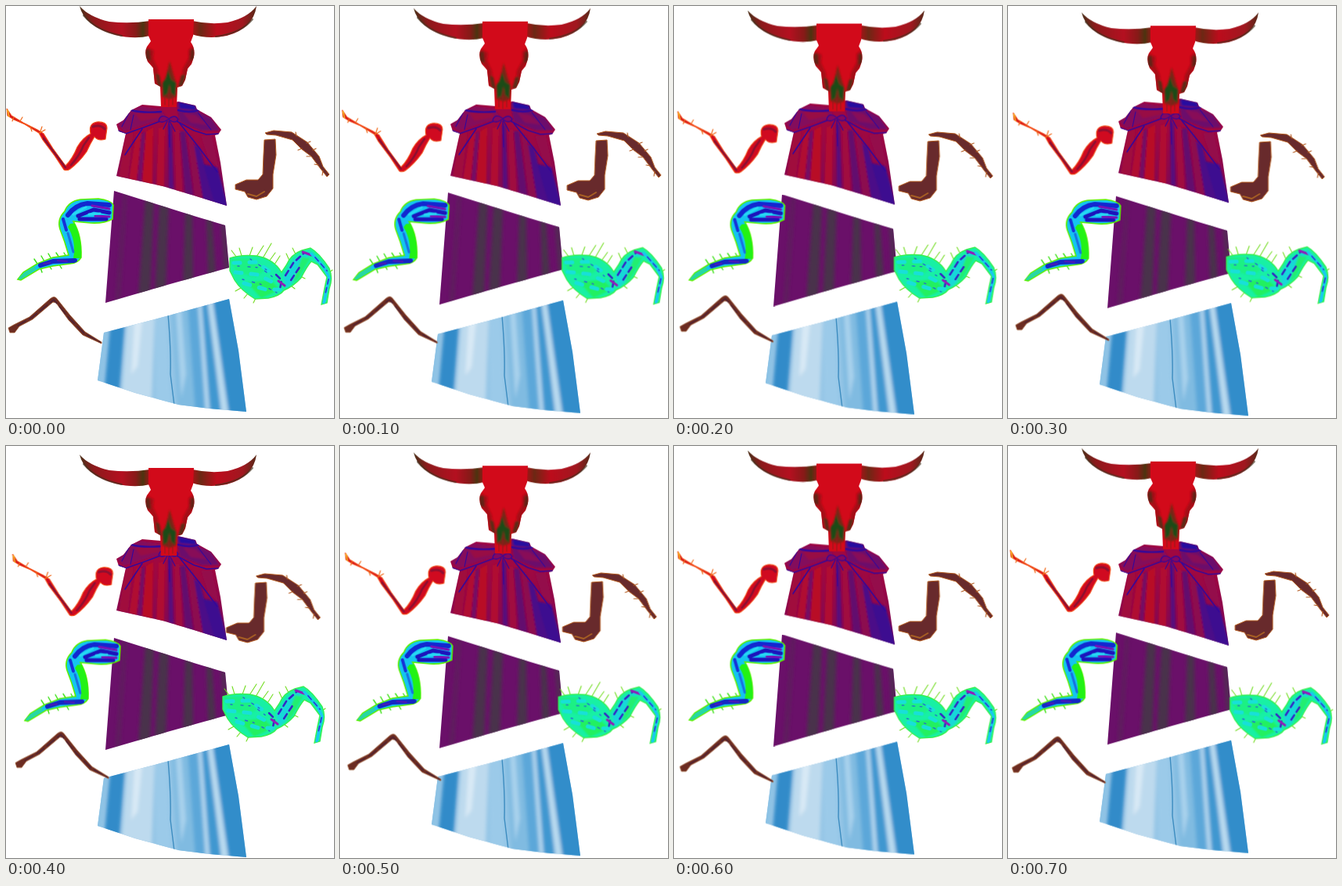
Recreate the animation shown at these times as an HTML page. Size 419x526 px, loop 0.8 s.

```html
<!DOCTYPE html>
<html lang="en">
<head>
<meta charset="utf-8">
<title>Loose creature</title>
<style>
html, body { margin: 0; width: 100%; height: 100%; overflow: hidden; background: #fff; }
svg { display: block; width: 100%; height: 100%; }

/* --x, --y: full travel; --b: bend away from a linear path */
.part { --x: 0px; --y: 0px; --b: 0px; animation: drift 800ms step-end infinite; }
@keyframes drift {
  0%, 100% { transform: translate(0, 0); }
  12.5%, 87.5% { transform: translate(calc(var(--x) * .25), calc(var(--y) * .25 + var(--b) * 3)); }
  25%, 75% { transform: translate(calc(var(--x) * .5), calc(var(--y) * .5 + var(--b) * 4)); }
  37.5%, 62.5% { transform: translate(calc(var(--x) * .75), calc(var(--y) * .75 + var(--b) * 3)); }
  50% { transform: translate(var(--x), var(--y)); }
}
#skull { --y: 11px; }
#cape { --y: -7px; --b: .5px; }
#waist { --y: 9px; }
#skirt { --y: 7px; }
#armL { --x: 7.5px; --y: 7px; }
#armR { --x: -11.5px; --y: 4px; }
#legL { --x: 9px; --y: 1.5px; }
#legR { --x: -9px; --y: -2px; }
#thin { --x: 9px; --y: -6.5px; --b: .4px; }

.line { fill: none; stroke-linecap: round; stroke-linejoin: round; }
</style>
</head>
<body>
<svg viewBox="0 0 419 526" preserveAspectRatio="none">
<defs>
  <filter id="soft" x="-20%" y="-20%" width="140%" height="140%"><feGaussianBlur stdDeviation="2"/></filter>
  <filter id="fine" x="-20%" y="-20%" width="140%" height="140%"><feGaussianBlur stdDeviation="1.1"/></filter>

  <linearGradient id="hornL" x1="94" x2="184" y1="0" y2="0" gradientUnits="userSpaceOnUse">
    <stop offset="0" stop-color="#493018"/><stop offset=".2" stop-color="#8c1a1c"/>
    <stop offset=".6" stop-color="#b41020"/><stop offset=".8" stop-color="#871a18"/>
    <stop offset=".9" stop-color="#4c3410"/><stop offset="1" stop-color="#a01418"/>
  </linearGradient>
  <linearGradient id="hornR" x1="319" x2="236" y1="0" y2="0" gradientUnits="userSpaceOnUse">
    <stop offset="0" stop-color="#5a2818"/><stop offset=".2" stop-color="#a01820"/>
    <stop offset=".6" stop-color="#bc0c1c"/><stop offset=".85" stop-color="#6c2814"/>
    <stop offset="1" stop-color="#b01018"/>
  </linearGradient>
  <linearGradient id="cloth" x1="0" x2="0" y1="160" y2="250" gradientUnits="userSpaceOnUse">
    <stop offset="0" stop-color="#a00840"/><stop offset="1" stop-color="#7c0858"/>
  </linearGradient>

  <path id="faceP" d="M182 17H240L239 38L236 46Q242 54 240 65L237 74L232 80L229 94L225 102L219 104L218 129H198L197 103L190 99L188 79L181 71Q176 60 180 52L185 45L182 38Z"/>
  <path id="capeP" d="M160 133L174 126L198 128L220 122L242 127L244 132L262 142L275 158L271 164L267 165L274 200L282 255L240 242L200 230L141 217L147 190L153 163L144 160L141 151L150 146Z"/>
  <path id="waistP" d="M138 236L240 268L280 280L285 334L206 356L127 379Z"/>
  <path id="skirtP" d="M125 417L190 400L285 374L297 440L307 518L260 514L220 509L165 494L117 478Z"/>
  <path id="legLP" d="M75 262Q80 249 95 247L118 246Q134 248 137 254L136 272Q125 278 108 277L86 275Q97 293 96 321Q92 328 82 329L60 332L42 336L19 350L15 349L22 340L40 329L60 321L80 318Q75 300 69 285Q65 272 75 262Z"/>
  <path id="legRP" d="M286 322Q300 317 320 319Q342 323 352 340L358 331Q364 317 378 312L389 309Q400 315 413 335Q418 347 413 361L410 379L403 381L407 360L410 346L398 330L390 326Q384 333 377 347Q367 358 355 363Q350 370 335 373L318 374Q300 363 292 350L286 338Z"/>

  <clipPath id="faceC"><use href="#faceP"/></clipPath>
  <clipPath id="capeC"><use href="#capeP"/></clipPath>
  <clipPath id="waistC"><use href="#waistP"/></clipPath>
  <clipPath id="skirtC"><use href="#skirtP"/></clipPath>
  <clipPath id="legLC"><use href="#legLP"/></clipPath>
  <clipPath id="legRC"><use href="#legRP"/></clipPath>
</defs>

<g id="waist" class="part">
  <use href="#waistP" fill="#6a1069"/>
  <g clip-path="url(#waistC)"><g filter="url(#soft)" fill="#4a324b">
    <path d="M178 245L189 250L184 368L169 370Z"/>
    <path d="M196 252L208 256L204 362L190 364Z"/>
    <path d="M229 262L238 266L239 352L226 354Z"/>
    <path d="M256 270L263 273L268 342L258 345Z"/>
    <path d="M274 276L281 280L286 338L279 340Z" opacity=".7"/>
    <path d="M150 238L155 240L146 376L139 378Z" opacity=".35"/>
  </g></g>
</g>

<g id="skirt" class="part">
  <use href="#skirtP" fill="#94c5e6"/>
  <g clip-path="url(#skirtC)"><g filter="url(#soft)">
    <path d="M122 410L130 408L121 484L112 480Z" fill="#8cc2e5"/>
    <path d="M133 408L152 404L145 492L126 486Z" fill="#318bc9"/>
    <path d="M155 402L190 394L186 503L148 494Z" fill="#bddaee"/>
    <path d="M164 402L174 400L168 460L160 470Z" fill="#d8e9f5"/>
    <path d="M190 396L205 393L211 512L192 508Z" fill="#9bcae9"/>
    <path d="M211 390L234 382L243 520L219 514Z" fill="#80bbe1"/>
    <path d="M217 390L224 387L230 470L224 500Z" fill="#a8d1ec"/>
    <path d="M232 382L246 378L257 522L242 520Z" fill="#5ba7d9"/>
    <path d="M245 380L249 378L260 522L255 520Z" fill="#b3d6ee"/>
    <path d="M250 378L258 376L275 522L261 520Z" fill="#4097d0"/>
    <path d="M257 376L263 374L284 522L276 522Z" fill="#b9daef"/>
    <path d="M264 372L290 368L314 526L285 522Z" fill="#338dca"/>
  </g>
  <path class="line" d="M207 394Q211 440 210 470L215 510" stroke="#3c8cc0" stroke-width="1.4"/></g>
</g>

<g id="cape" class="part">
  <use href="#capeP" fill="url(#cloth)"/>
  <g clip-path="url(#capeC)">
    <g filter="url(#fine)">
      <path d="M153 165L163 160L156 220L144 218Z" fill="#a0083c"/>
      <path d="M166 164L173 158L167 223L157 221Z" fill="#b00830"/>
      <path d="M179 160L188 155L187 228L174 224Z" fill="#b80828"/>
      <path d="M195 156L203 154L202 231L192 229Z" fill="#b00830"/>
      <path d="M173 163L178 160L173 224L168 223Z" fill="#740864"/>
      <path d="M207 152L212 152L214 234L208 232Z" fill="#58087c"/>
      <path d="M215 158L221 158L226 238L217 236Z" fill="#a00840"/>
      <path d="M222 160L229 160L239 242L229 239Z" fill="#64086e"/>
      <path d="M232 164L238 166L251 246L241 242Z" fill="#8c0850"/>
      <path d="M240 176L248 182L266 252L252 247Z" fill="#4c0888"/>
      <path d="M249 166L263 165L272 208L258 194Z" fill="#94084c"/>
      <path d="M252 202L270 206L284 258L266 252Z" fill="#3c0890"/>
      <path d="M155 136L172 128L198 132L205 143L185 149L151 160L143 152Z" fill="#84085c"/>
      <path d="M218 124L242 127L244 134L262 143L273 159L250 159L222 148Z" fill="#6c086c"/>
      <path d="M165 137L192 133L198 142L172 147Z" fill="#980844"/>
      <path d="M226 136L242 139L258 152L236 149Z" fill="#880858"/>
      <path d="M220 122L242 127L243 133L222 131Z" fill="#2808a0"/>
    </g>
    <g class="line" stroke="#34089a" stroke-width="1.6">
      <path d="M143 159L153 163L176 155L200 146M216 146L240 159L256 164L273 163"/>
      <path d="M174 157L152 190M222 150L246 180L270 212"/>
      <path d="M160 133Q175 137 198 135M220 133Q235 137 246 133" stroke-width="2.4"/>
      <path d="M157 137L148 154M163 139L159 158M245 136L262 158" stroke-width="1.2"/>
    </g>
  </g>
  <g class="line" stroke="#400890" stroke-width="1.4">
    <path d="M207 143Q198 137 195 146Q198 151 207 145Q216 137 220 145Q216 151 208 145" fill="#840860"/>
    <path d="M206 147L201 157M209 147L216 160M208 147L209 180"/>
  </g>
</g>

<g id="skull" class="part">
  <path d="M94 0Q106 14 132 20Q158 23 184 19V38Q164 43 140 37Q100 26 94 0Z" fill="url(#hornL)"/>
  <path d="M320 0Q309 15 283 21Q260 24 238 19L237 36Q258 43 282 38Q316 29 320 0Z" fill="url(#hornR)"/>
  <path class="line" d="M99 12Q116 32 148 38M315 17Q300 35 268 39" stroke="#42301c" stroke-width="2" opacity=".65"/>
  <use href="#faceP" fill="#d20a1a"/>
  <g clip-path="url(#faceC)">
    <g filter="url(#fine)">
      <path d="M180 52L189 57L188 67L194 80L197 102L190 100L186 76L178 68Z" fill="#a81018"/>
      <path d="M240 50L233 56L233 67L226 80L224 102L230 99L234 78L242 66Z" fill="#a41018"/>
      <path d="M178 55L184 56L185 70L178 68ZM241 55L236 56L235 70L241 68Z" fill="#642414"/>
      <path d="M209 70L214 88L218 100L217 116L209 119L200 116L200 100L205 88Z" fill="#782812"/>
      <path d="M207 82L211 94L217 98L216 115L211 111L209 99L206 112L201 115L200 98L204 93Z" fill="#1c4b14"/>
      <path d="M191 86L196 88L199 104L194 102ZM229 88L224 88L220 103L226 102Z" fill="#5c2c14"/>
    </g>
    <path class="line" d="M208 112V128M203 115V126M213 115V126" stroke="#901a1c" stroke-width="1"/>
  </g>
</g>

<g id="armL" class="part">
  <path d="M1 131L7 140L22 149L40 158L48 163L60 182L76 204Q85 195 91 180Q98 168 108 163Q105 150 116 148Q129 147 129 156L127 170Q118 173 113 167Q108 175 103 186Q93 200 82 208Q78 211 74 209L62 191L47 171L42 162L24 151L10 145L2 140Z" fill="#d00a20" stroke="#f4501a" stroke-width="1.1"/>
  <g class="line">
    <path d="M48 169L76 206M83 203Q94 191 99 178L106 168" stroke="#8c1030" stroke-width="2.5"/>
    <path d="M111 154Q121 151 126 157" stroke="#901030" stroke-width="3"/>
    <path d="M43 163L46 154M43 162L50 158M18 147L21 142M10 142L8 147M31 154L33 160" stroke="#f06818" stroke-width="1.2"/>
    <path d="M2 133L4 141" stroke="#f6c020" stroke-width="1.5"/>
  </g>
</g>

<g id="armR" class="part">
  <g fill="#682a2c" stroke="#b45c20" stroke-width="1">
    <path d="M330 171L344 170L345 190L341 215L341 233L333 243L320 247L309 244L305 237L293 234L293 228L307 222L322 222L328 215L329 190Z"/>
    <path d="M331 162L342 159L365 161L385 174L400 192L405 205L413 215L410 218L402 208L390 192L378 183L366 171L345 165L333 164Z"/>
  </g>
  <g class="line">
    <path d="M309 240L320 243L330 237" stroke="#a86024" stroke-width="2"/>
    <path d="M371 166L370 161M384 175L389 173M392 184L396 182M378 182L373 184M389 192L384 192M399 203L394 202M405 210L404 216" stroke="#b45c24" stroke-width="1.2"/>
  </g>
</g>

<g id="legL" class="part">
  <path class="line" d="M40 329L36 323M49 326L45 319M58 323L54 316M68 321L64 315M77 320L74 315M44 334L46 340M55 331L58 336M68 330L71 335" stroke="#38e010" stroke-width="1.4"/>
  <use href="#legLP" fill="#14c4f0" stroke="#5cf000" stroke-width="1.6"/>
  <g clip-path="url(#legLC)">
    <path d="M82 278L90 277L100 322L86 322Q90 300 79 282Z" fill="#22f216"/>
    <g class="line">
      <path d="M79 267Q88 254 104 252L132 254" stroke="#1228d0" stroke-width="6"/>
      <path d="M92 268L112 260L132 264M94 272L128 272" stroke="#1c14bc" stroke-width="5"/>
      <path d="M110 255L132 259M114 268L132 269" stroke="#7810b8" stroke-width="3"/>
      <path d="M86 266L102 257M106 266L120 265" stroke="#28d8f4" stroke-width="3"/>
      <path d="M73 272L77 286" stroke="#1830d8" stroke-width="4"/>
      <path d="M79 290L86 314" stroke="#1870e0" stroke-width="3"/>
      <path d="M88 325L60 326L44 331" stroke="#1428c4" stroke-width="6"/>
      <path d="M78 326L66 325M56 328L48 329" stroke="#5018b8" stroke-width="2"/>
      <path d="M36 335L18 347" stroke="#28d8a0" stroke-width="4"/>
    </g>
  </g>
</g>

<g id="legR" class="part">
  <path class="line" d="M294 320L288 312M301 319L298 309M311 319L315 308M320 320L329 306M328 322L339 303M336 326L344 315M343 330L350 319M362 325L358 316M370 317L366 309M300 360L293 364M309 367L304 373M319 373L316 379M364 357L369 361M376 345L382 348M413 340L417 337" stroke="#72dc20" stroke-width="1.1"/>
  <use href="#legRP" fill="#18f0a4" stroke="#38f050" stroke-width="1.4"/>
  <g clip-path="url(#legRC)">
    <g filter="url(#fine)">
      <path d="M286 322L312 322L330 338L318 346L294 339Z" fill="#1cf084"/>
      <path d="M308 353L338 350L350 362L326 373Z" fill="#20f060"/>
      <path d="M354 345L368 323L388 313L378 340L358 361Z" fill="#18d8d8"/>
      <path d="M378 320L388 322L374 347L366 354Z" fill="#24ee70"/>
    </g>
    <g class="line">
      <path d="M291 328L320 327L344 344M293 340L322 343L345 355M304 354L332 362L350 362" stroke="#18e0d8" stroke-width="5" stroke-dasharray="8 12"/>
      <path d="M296 332L325 334L346 350M302 349L325 355L346 366M312 323L336 339" stroke="#2464d4" stroke-width="1.4" stroke-dasharray="2 11 3 7"/>
      <path d="M345 343L352 350L350 361M357 344L367 328L380 316M364 350L376 332" stroke="#3428c4" stroke-width="2.5" stroke-dasharray="7 5"/>
      <path d="M379 314L390 318M348 351L356 357" stroke="#9020b8" stroke-width="3"/>
      <path d="M390 316L406 333L413 347L409 364L406 379" stroke="#18c8f0" stroke-width="3.5"/>
      <path d="M395 321L410 338M412 349L408 367" stroke="#2840d0" stroke-width="1.8" stroke-dasharray="6 5"/>
    </g>
  </g>
</g>

<g id="thin" class="part">
  <path d="M3 411L10 407L30 397L55 375Q62 368 66 375L82 395L101 416L122 429L122 431L98 420L80 401L64 379L60 378L34 400L17 409L11 417L5 417Z" fill="#6c2c22" stroke="#98542c" stroke-width=".8"/>
  <path class="line" d="M15 408L34 397L61 375L80 398L100 418L120 429" stroke="#4a2034" stroke-width="1.4" stroke-dasharray="12 5"/>
</g>
</svg>
</body>
</html>
```
